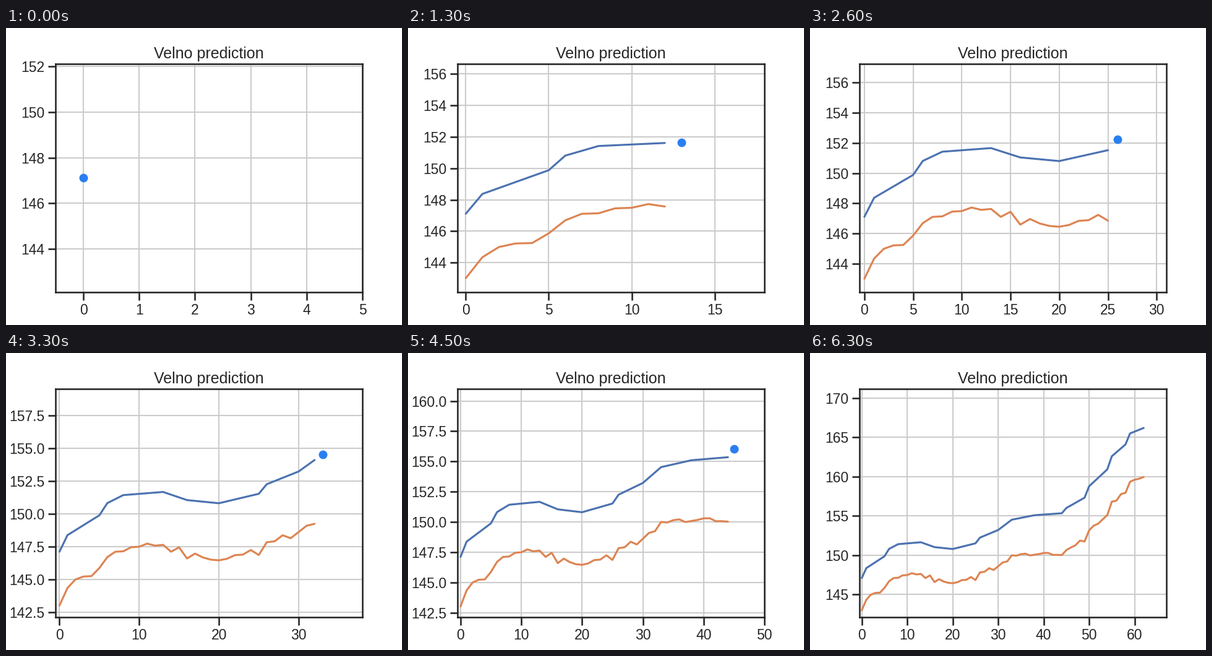
These frames come from a looping animation (640x480 px, 10000 ms). A matplotlib script:

```python
import matplotlib.pyplot as plt
import numpy as np
from matplotlib.animation import FuncAnimation

INK = "0.15"
FRAMES, INTERVAL = 100, 100
LAST_DAY = 62
MARGIN = 5

plt.rcParams.update({
    "font.family": "Liberation Sans",
    "text.color": INK,
    "axes.edgecolor": INK,
    "axes.linewidth": 1.875,
    "axes.titlesize": 18,
    "axes.grid": True,
    "axes.axisbelow": True,
    "grid.color": "0.8",
    "grid.linewidth": 1.5,
    "lines.linewidth": 2.25,
    "lines.solid_capstyle": "round",
    "lines.markersize": 9,
})
for axis in ("xtick", "ytick"):
    plt.rcParams.update({
        f"{axis}.color": INK,
        f"{axis}.labelsize": 16.5,
        f"{axis}.major.size": 9,
        f"{axis}.major.width": 1.875,
    })

# Turning points of the upper curve: (day, value).
TURNS = [
    (0, 147.11), (1, 148.37), (5, 149.88), (6, 150.81), (8, 151.42),
    (13, 151.66), (16, 151.04), (20, 150.8), (25, 151.52), (26, 152.25),
    (30, 153.22), (33, 154.53), (38, 155.1), (44, 155.35), (45, 156.02),
    (49, 157.33), (50, 158.78), (54, 160.93), (55, 162.6), (58, 164.1),
    (59, 165.5), (LAST_DAY, 166.2),
]
days = np.arange(LAST_DAY + 1)
upper = np.interp(days, *zip(*TURNS))
peak = np.maximum.accumulate(upper)

# The lower curve trails by a slowly widening gap with a little daily noise.
noise = np.random.default_rng(4).normal(0, 0.15, len(days))
lower = upper - 4 - 2.4 * (days / LAST_DAY) ** 2 + noise

fig, ax = plt.subplots(figsize=(6.4, 4.8), dpi=100)
ax.set_title("Velno prediction")
upper_line, = ax.plot([], [], color="#4C72B0")
lower_line, = ax.plot([], [], color="#DD8452")
dot, = ax.plot([], [], "o", color="#2a7ff0")


def draw(frame):
    count = min(frame, len(days))
    head = min(frame, LAST_DAY)
    upper_line.set_data(days[:count], upper[:count])
    lower_line.set_data(days[:count], lower[:count])
    # The dot leads the lines by one day and vanishes once they are complete.
    dot.set_data(days[count:count + 1], upper[count:count + 1])
    ax.set_xlim(-0.5, head + MARGIN)
    ax.set_ylim(upper[0] - MARGIN, peak[head] + MARGIN)
    return upper_line, lower_line, dot


animation = FuncAnimation(fig, draw, frames=FRAMES, interval=INTERVAL,
                          init_func=lambda: draw(0), repeat=True,
                          repeat_delay=0, blit=False)
plt.show()
```
